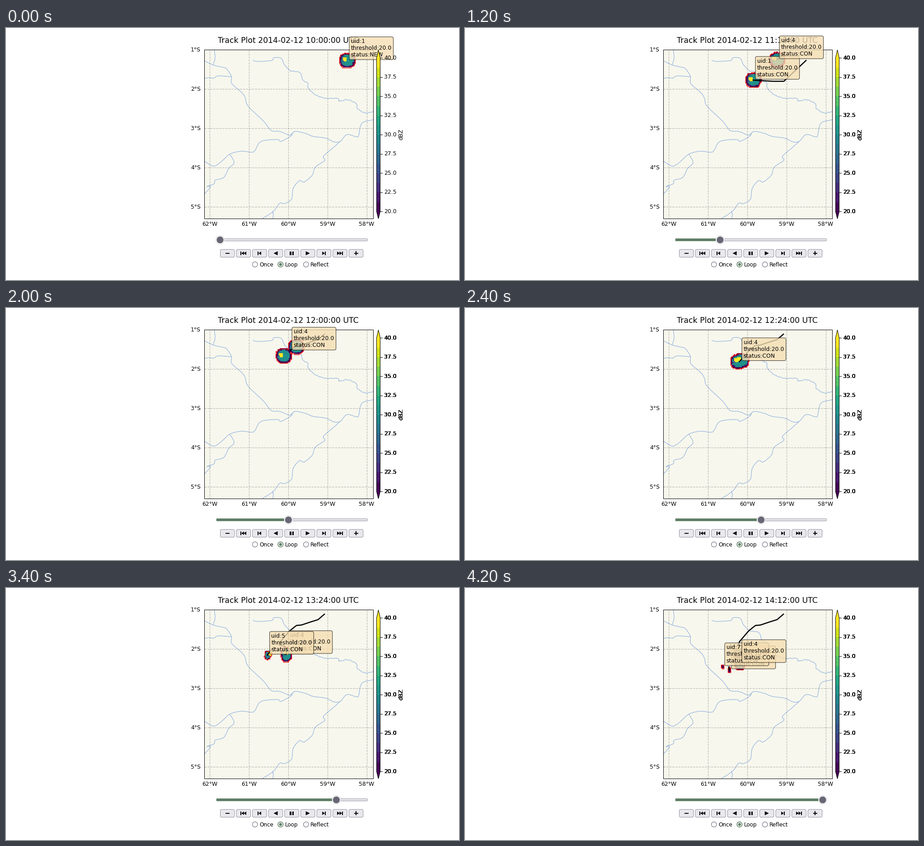
These frames come from a looping animation (1003 px wide and 558 px high, 4.4 s). A matplotlib script:

```python
import numpy as np
import matplotlib.pyplot as plt
from matplotlib.animation import FuncAnimation
from matplotlib.collections import LineCollection
from matplotlib.patches import Circle, FancyBboxPatch, Polygon, Rectangle

W, H, FRAMES = 1003, 558, 22
X0, X1, Y0, Y1 = 438.5, 812.5, 48.5, 422.5   # map box in pixels
DEG = 86.9
GREY, GREEN, FACE = "#8f8f9d", "#5f7f66", "#e9e9ed"

plt.rcParams["font.family"] = "DejaVu Sans"
plt.rcParams["font.size"] = 12.36

# 72 dpi makes one point one pixel
fig = plt.figure(figsize=((W + .01) / 72, (H + .01) / 72), dpi=72, facecolor="white")
ax = fig.add_axes([0, 0, 1, 1])
ax.set_xlim(0, W)
ax.set_ylim(H, 0)
ax.axis("off")

# ---- map ----
land = ax.add_patch(Rectangle((X0, Y0), X1 - X0, Y1 - Y0, fc="#f7f7ed", ec="none", zorder=0))


def river(*pts, wave=0):
    """Catmull-Rom curve through the points, with an optional small ripple."""
    p = np.array(pts, float)
    p = np.vstack([2 * p[0] - p[1], p, 2 * p[-1] - p[-2]])
    t = np.linspace(0, 1, 9)[:, None]
    x, y = np.vstack([.5 * (2 * b + (c - a) * t + (2 * a - 5 * b + 4 * c - d) * t**2
                            + (3 * b - a - 3 * c + d) * t**3)
                      for a, b, c, d in zip(p, p[1:], p[2:], p[3:])]).T
    y = y + wave * np.sin(x * .6)
    line, = ax.plot(x, y, color="#97b6e1", lw=1.24, zorder=1)
    line.set_clip_path(land)


river((461, 48), (463, 66), (459, 81))
river((438, 72), (459, 82), (480, 87), (488, 90), (499, 107), (500, 123), (522, 143),
      (530, 155), (536, 173), (571, 207), (587, 227), (606, 229), (626, 237), (633, 235))
river((633, 235), (640, 229), (662, 233), (680, 240), (708, 244), (726, 252), (740, 251),
      (755, 236), (776, 241), (781, 237), (788, 211), (813, 203))
river((438, 112), (449, 110), (460, 111), (470, 106), (499, 108))
river((547, 72), (557, 74), (588, 72), (593, 66), (609, 67), (617, 82), (630, 95))
river((630, 95), (651, 99), (657, 115), (668, 122), (669, 132), (682, 146),
      (697, 153), (709, 156), wave=.5)
river((709, 156), (735, 156), (738, 162), (757, 159), (776, 168), (778, 178),
      (795, 188), (813, 185), wave=.7)
river((438, 294), (456, 305), (466, 304), (480, 293), (496, 279), (520, 273), (545, 275),
      (552, 270), (565, 251), (601, 247), (609, 251), (631, 239), (633, 233))
river((496, 280), (505, 298), (493, 311), (482, 331), (463, 337), (461, 345),
      (445, 351), (453, 352), (438, 369))
river((740, 251), (728, 262), (703, 284), (706, 293), (685, 308), (678, 326),
      (660, 341), (650, 338), (636, 355), (632, 379), (616, 389), (606, 388),
      (592, 406), (566, 423))
river((590, 406), (592, 414), (590, 423))

grid = dict(color="grey", alpha=.5, lw=1.24, ls="--", zorder=1.5)
for i in range(5):
    x, y = 451.3 + 86.8 * i, Y0 + DEG * i
    ax.plot([x, x], [Y1, Y0], **grid)
    ax.text(x, 434.5, f"{62 - i}°W", ha="center", va="center")
    if i:
        ax.plot([X0, X1], [y, y], **grid)
    ax.text(431, y, f"{i + 1}°S", ha="right", va="center")
ax.add_patch(Rectangle((X0, Y0), X1 - X0, Y1 - Y0, fc="none", ec="black", lw=1, zorder=3.5))
title = ax.text(625, 33.3, "", size=17.3, ha="center", va="baseline", zorder=4)

# ---- colour bar ----
viridis = plt.get_cmap("viridis")
BL, BR, BT, BB, BANDS = 820.5, 828.5, 66, 406.5, 16
mid = (BL + BR) / 2
step = (BB - BT) / BANDS
for i in range(BANDS):
    ax.add_patch(Rectangle((BL, BB - (i + 1) * step), BR - BL, step + .3,
                           fc=viridis(i / (BANDS - 1)), ec="none", zorder=8))
for base, tip, c in ((BT, Y0, 1.0), (BB, Y1, 0.0)):
    ax.add_patch(Polygon([(BL, base), (mid, tip), (BR, base)], fc=viridis(c), ec="none", zorder=8))
ax.add_patch(Polygon([(BL, BT), (mid, Y0), (BR, BT), (BR, BB), (mid, Y1), (BL, BB)],
                     fc="none", ec="black", lw=1, zorder=9))


def bar_labels(copies):
    """Labels are struck repeatedly, so they grow heavier."""
    made = []
    for _ in range(copies):
        for i in range(9):
            y = BB - i * (BB - BT) / 8
            made += ax.plot([BR, BR + 4.3], [y, y], color="black", lw=1, zorder=9)
            made.append(ax.text(837, y, f"{20 + 2.5 * i:.1f}", va="center", zorder=9))
        made.append(ax.text(875, 236, "dBZ", rotation=90, ha="center", va="center", zorder=9))
    return made


# ---- player controls ----
def pill(x, y, w, h, r):
    ax.add_patch(FancyBboxPatch((x + r, y + r), w - 2 * r, h - 2 * r, fc=FACE, ec=GREY,
                                lw=1, boxstyle=f"round,pad={r}"))


def bar(x, w, h):
    ax.add_patch(Rectangle((x - w / 2, CY - h / 2), w, h, fc="black", ec="none", zorder=5))


def arrow(x, s, w=5.5, h=8):
    ax.add_patch(Polygon([(x - s * w / 2, CY - h / 2), (x + s * w / 2, CY),
                          (x - s * w / 2, CY + h / 2)], fc="black", ec="none", zorder=5))


pill(466, 466.7, 334.5, 4.8, 2.3)
fill = ax.add_patch(Rectangle((466, 466.4), 1, 5.4, fc=GREEN, ec="none", zorder=4))
thumb = [ax.add_patch(Circle((0, 469.2), r, fc=c, ec="none", zorder=5 + i))
         for i, (r, c) in enumerate([(10, "#d6d6db"), (9, "white"), (7.6, "#676774")])]

CY = 498.8
cx = [490.2 + 35.6 * i for i in range(9)]
for x in cx:
    pill(x - 15.7, 490.3, 31.4, 17.2, 3)
bar(cx[0], 9, 2.2)
bar(cx[8], 9, 2.2)
bar(cx[8], 2.2, 9)
for s in (-1, 1):
    fast, single, play = (cx[4 + s * j] for j in (3, 2, 1))
    bar(fast + s * 5.5, 2, 8)
    arrow(fast + s * 1.8, s)
    arrow(fast - s * 3.5, s)
    bar(single + s * 3.2, 2, 8)
    arrow(single - s * .8, s)
    arrow(play, s, 9, 9)
    bar(cx[4] + s * 2.7, 3.2, 8)

for i, name in enumerate(("Once", "Loop", "Reflect")):
    x, on = 551.3 + 56.5 * i, name == "Loop"
    ax.add_patch(Circle((x, 523.6), 5.7, fc="white", ec=GREEN if on else GREY, lw=1.5))
    if on:
        ax.add_patch(Circle((x, 523.6), 3.2, fc=GREEN, ec="none"))
    ax.text(x + 9.6, 528, name, size=12, va="baseline")

# ---- storm cells ----
# key points: step, x, y
WEST = np.array([(0, 755, 72), (3, 706, 118), (4, 682, 118), (6, 638, 115.5),
                 (8, 621.5, 107.5), (10, 614, 106), (13, 600, 125), (15, 586, 138),
                 (18, 575, 154)])
EAST = np.array([(4, 719, 46), (5, 705, 58), (6, 691, 70), (7, 675, 75), (8, 654, 82),
                 (9, 643, 83), (10, 628, 95), (12, 608, 118.5), (13, 605, 126),
                 (14, 617, 129), (15, 622, 136.5), (17, 620, 147), (19, 608, 156),
                 (21, 608, 167)])
BIT_A = np.array([(19, 566.5, 157.5), (21, 570, 174)])
BIT_B = np.array([(19, 583, 168.5), (20, 584, 175), (21, 585, 181)])

Q = 2.17                       # radar pixel
n = int((X1 - X0) / Q)
centres = (np.arange(n) + .5) * Q
GX, GY = np.meshgrid(X0 + centres, Y0 + centres)
rough = np.random.default_rng(4).normal(0, .025, GX.shape)
PALETTE = np.array([(0, 0, 0, 0), viridis(0.0), viridis(.33), viridis(.5), viridis(1.0)])


def at(path, k):
    return np.interp(k, path[:, 0], path[:, 1]), np.interp(k, path[:, 0], path[:, 2])


def trail(path, start, k):
    return [at(path, j) for j in range(start, k + 1)]


def blob(x, y, rx, ry):
    u, v = abs(GX - x) / rx, abs(GY - y) / ry
    d = (u**2.4 + v**2.4) ** (1 / 2.4) + rough * (rx > 6)
    lev = (d < 1).astype(int)
    if rx > 6:
        lev[d < .8] = 2
        lev[d < .74] = 3
        dx, dy = GX - (x - 1 - (rx - 12)), GY - (y - 2)
        near = np.maximum(abs(dx), abs(dy))
        lev[(near < 6) & (dx < 0) & (d < .8)] = 2
        lev[(near < 4.3) & ~((dx < -1.5) & (dy > 1.5))] = 4
    return lev


def cells(k):
    out = []
    if k <= 18:
        out.append((*at(WEST, k), np.interp(k, [12, 14, 15, 18], [17.3, 11.5, 12, 4]),
                    np.interp(k, [15, 18], [16.3, 6])))
    else:
        grow = k - 19
        out += [(*at(BIT_A, k), 1.4 + .8 * grow, 3 + .8 * grow),
                (*at(BIT_B, k), 2.2 + .9 * grow, 2.6 + 1.7 * grow)]
    if k >= 4:
        x, y = at(EAST, k)
        apart = np.interp(k, [9, 10, 12.6], [0, 1, 0])   # offset while the cells merge
        out.append((x + 14 * apart, y - 9 * apart,
                    np.interp(k, [12, 14, 21], [17.3, 12, 11.5]),
                    np.interp(k, [19, 21], [16.3, 14.5])))
    return out


def outline(mask):
    m = np.pad(mask, 1).astype(int)
    segs = []
    for r, c in zip(*np.nonzero(np.diff(m[:, 1:-1], axis=0))):
        segs.append([(X0 + c * Q, Y0 + r * Q), (X0 + (c + 1) * Q, Y0 + r * Q)])
    for r, c in zip(*np.nonzero(np.diff(m[1:-1], axis=1))):
        segs.append([(X0 + c * Q, Y0 + r * Q), (X0 + c * Q, Y0 + (r + 1) * Q)])
    return segs


def labels(k):
    """Tags as (uid, points so far), bottom one first."""
    # uid, path, first step, last step
    spans = [(1, WEST, 0, 9), (6, BIT_B, 20, 21), (7, BIT_A, 21, 21),
             (4, EAST, 5, 21), (5, WEST, 14, 17)]
    return [(uid, trail(path, a, k)) for uid, path, a, b in spans if a <= k <= b]


radar = ax.imshow(np.zeros((n, n, 4)), extent=(X0, X0 + n * Q, Y0 + n * Q, Y0),
                  origin="upper", interpolation="nearest", aspect="auto", zorder=2)
edges = ax.add_collection(LineCollection([], colors="red", linewidths=1.4, zorder=3),
                          autolim=False)
moving = []


def update(i):
    k = 4 if i == 5 else i     # one step is held twice as long
    while moving:
        moving.pop().remove()
    minutes = 12 * k
    title.set_text(f"Track Plot 2014-02-12 {10 + minutes // 60}:{minutes % 60:02d}:00 UTC")

    level, ringed = np.zeros((n, n), int), np.zeros((n, n), bool)
    for c in cells(k):
        lev = blob(*c)
        level = np.maximum(level, lev)
        if k != 19 or c[2] > 6:
            ringed |= lev > 0
    radar.set_data(PALETTE[level])
    edges.set_segments(outline(ringed))

    for z, (uid, pts) in enumerate(labels(k)):
        x, y = pts[-1]
        if len(pts) > 1:
            moving.extend(ax.plot(*zip(*pts), color="black", lw=2.5, zorder=4))
        status = "CON" if len(pts) > 1 else "NEW"
        moving.append(ax.text(
            x + 8.7, y - 8.7, f"uid:{uid}\nthreshold:20.0\nstatus:{status}",
            va="baseline", zorder=5 + z / 10,
            bbox=dict(boxstyle="round", fc="wheat", alpha=.8)))
    moving.extend(bar_labels(min(k + 1, 8)))

    x = 474 + 318 * k / 21
    fill.set_width(x - 466)
    fill.set_visible(k > 0)
    for c in thumb:
        c.set_center((x, 469.2))
    return []


anim = FuncAnimation(fig, update, frames=FRAMES, interval=200, init_func=lambda: update(0),
                     repeat=True, blit=False)
plt.show()
```
